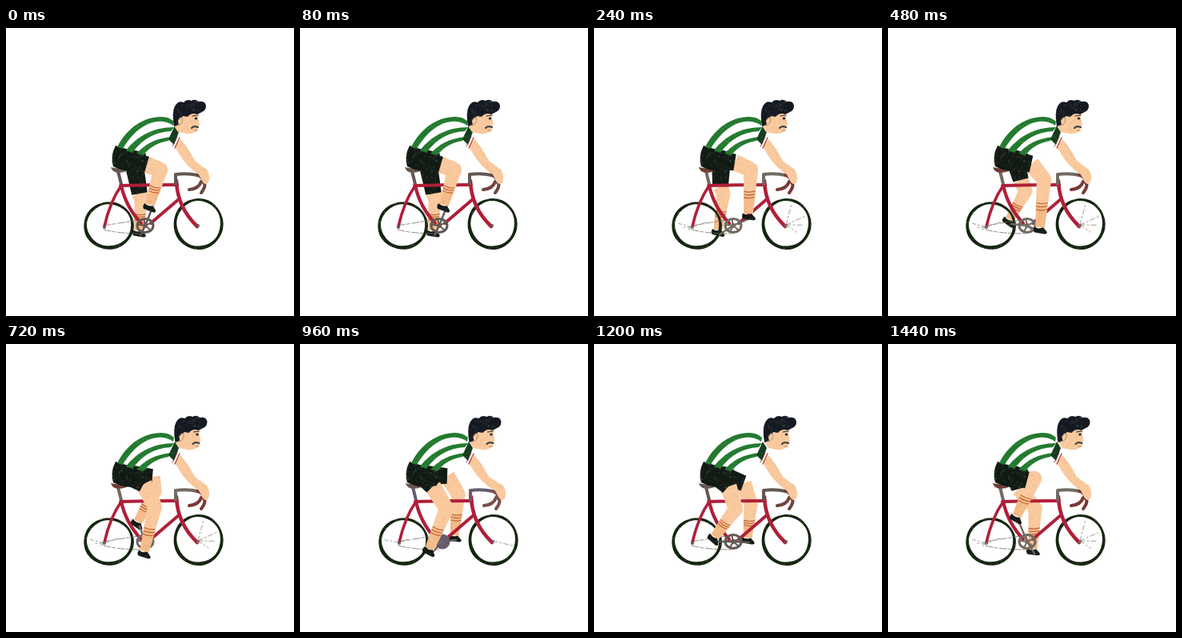
Recreate the animation shown at these times as an HTML page with a canvas. Size 360 by 360 pixels, loop 1.68 s.

```html
<!DOCTYPE html>
<html lang="en">
<head>
<meta charset="utf-8">
<title>Cyclist</title>
<style>
html, body { margin: 0; width: 100%; height: 100%; overflow: hidden; background: #fff; }
canvas { display: block; width: 360px; height: 360px; }
</style>
</head>
<body>
<canvas id="stage" width="360" height="360"></canvas>
<script>
const ctx = document.getElementById('stage').getContext('2d');
const STEP = 240;
const SKIN = '#fac99d', SOCK = '#f5bb88', BLACK = '#121a14', GREEN = '#227a2e', RED = '#b01f38', TYRE = '#14240f';

// Each leg: hem x, y, knee x, y, ankle x, y.
const poses = [
  { near: [176, 171, 193, 177, 180, 221], far: [167, 207, 169, 213, 166, 253], head: 0, look: 'bare' },
  { near: [176, 168, 196, 177, 193, 232], far: [158, 198, 162, 207, 155, 252], head: 0, look: 'spoked' },
  { near: [179, 170, 195, 189, 190, 249], far: [166, 190, 172, 204, 152, 239], head: 1, look: 'spoked' },
  { near: [172, 175, 186, 203, 173, 259], far: [183, 166, 186, 184, 165, 222], head: 1.5, look: 'spoked' },
  { near: [166, 178, 183, 206, 162, 256], far: [184, 165, 198, 188, 193, 239], head: 1.5, look: 'solid' },
  { near: [168, 178, 177, 206, 151, 241], far: [187, 174, 196, 200, 192, 242], head: 3, look: 'bare' },
  { near: [174, 170, 183, 168, 161, 215], far: [164, 181, 184, 205, 181, 256], head: 2.5, look: 'spoked' }
];
const looks = {
  bare: { metal: '#625752', saddle: '#685850', grip: '#704541' },
  spoked: { metal: '#716b62', saddle: '#713c33', grip: '#7b3935' },
  solid: { metal: '#665b6c', saddle: '#6b5350', grip: '#7c504d' }
};

function makeGrain() {
  const tile = document.createElement('canvas');
  tile.width = tile.height = 64;
  const g = tile.getContext('2d');
  let seed = 17;
  const random = () => (seed = seed * 16807 % 2147483647) / 2147483647;
  for (let i = 0; i < 420; i++) {
    g.fillStyle = random() < 0.6 ? 'rgba(255,255,255,.1)' : 'rgba(40,30,0,.05)';
    g.fillRect(random() * 64, random() * 64, 1 + random(), 1 + random());
  }
  return ctx.createPattern(tile, 'repeat');
}
const grain = makeGrain();

function fill(shape, color) {
  const path = typeof shape === 'string' ? new Path2D(shape) : shape;
  for (const style of [color, grain]) {
    ctx.fillStyle = style;
    ctx.fill(path, 'evenodd');
  }
}

function line(d, color, width) {
  ctx.strokeStyle = color;
  ctx.lineWidth = width;
  ctx.stroke(new Path2D(d));
}

function disc(x, y, r, color) {
  const path = new Path2D();
  path.arc(x, y, r, 0, Math.PI * 2);
  fill(path, color);
}

function taper(x1, y1, r1, x2, y2, r2, color) {
  const a = Math.atan2(y2 - y1, x2 - x1), nx = -Math.sin(a), ny = Math.cos(a);
  const path = new Path2D();
  path.moveTo(x1 + nx * r1, y1 + ny * r1);
  path.lineTo(x2 + nx * r2, y2 + ny * r2);
  path.lineTo(x2 - nx * r2, y2 - ny * r2);
  path.lineTo(x1 - nx * r1, y1 - ny * r1);
  path.closePath();
  fill(path, color);
}

function leg([hx, hy, kx, ky, ax, ay], hipX, size) {
  taper(hx, hy, 10.5 * size, kx, ky, 9.2 * size, SKIN);
  disc(kx, ky, 9.2 * size, SKIN);
  taper(kx, ky, 9.2 * size, ax, ay, 5.6 * size, SKIN);
  taper((kx + ax) / 2, (ky + ay) / 2, 7.4 * size, ax, ay, 5.6 * size, SOCK);

  const lean = Math.atan2(kx - ax, ay - ky);
  ctx.save();
  ctx.translate(ax, ay);
  ctx.rotate(lean);
  const length = Math.hypot(kx - ax, ky - ay);
  for (const t of [0.36, 0.43, 0.5]) {
    const y = -length * t, half = 5.2 + 3 * t;
    line(`M${-half} ${y}Q0 ${y + 1.5} ${half} ${y - 1}`, '#bd5f35', 1.1);
  }
  fill('M-7 0Q-2 3 4 0L9 5Q10 8 6 8L-6 7Q-9 5-7 0Z', BLACK);
  ctx.restore();

  taper(hipX, 164, 12, hx, hy, 10.5 * size, BLACK);
}

function wheel(x, y, rx, ry) {
  const path = new Path2D();
  const trace = (cx, cy, inset, wobble) => {
    for (let deg = 0; deg <= 360; deg += 6) {
      const a = deg * Math.PI / 180, r = 1 + wobble * Math.sin(5 * a + 1);
      path[deg ? 'lineTo' : 'moveTo'](cx + Math.cos(a) * (rx - inset) * r, cy + Math.sin(a) * (ry - inset) * r);
    }
    path.closePath();
  };
  trace(x, y, 0, 0.006);
  trace(x + 0.3, y - 0.6, 3.7, -0.008);
  fill(path, TYRE);
}

function spokes(x, y, angles, reach) {
  ctx.setLineDash([6, 3, 2, 3]);
  angles.forEach((deg, i) => {
    const a = deg * Math.PI / 180, r = reach - i % 3 * 5;
    line(`M${x} ${y}L${x + Math.cos(a) * r} ${y + Math.sin(a) * r}`, '#77736e', 0.7);
  });
  ctx.setLineDash([]);
}

function bike(look) {
  const { metal, saddle, grip } = looks[look];
  const shift = look === 'solid' ? 1 : 0;
  ctx.save();
  ctx.translate(shift, 0);
  wheel(128.5, 247, 31.3, 29.7);
  wheel(240.5, 245, 31, 32);
  if (look === 'spoked') {
    spokes(123, 249, [-165, 178, 150, -20], 18);
    spokes(240, 246, [-24, 1, 35, -75], 26);
  } else if (look === 'solid') {
    spokes(123, 248, [-170, -20], 18);
    spokes(240, 246, [14], 27);
  }
  ctx.setLineDash([9, 2, 4, 3]);
  line('M122 247L166 240M122 252Q140 257 172 257', '#77706b', 0.8);
  ctx.setLineDash([]);

  line('M140 179L144 195', metal, 4);
  fill('M131 174Q142 177 155 175Q153 180 141 181Q133 181 131 174Z', saddle);
  line('M144 197Q130 217 123 248', RED, 3.6);
  line('M144 197Q150 224 169 244', RED, 4.2);
  line('M143 197Q180 196 214 196', RED, 3.8);
  line('M216 214L181 244', RED, 4);
  line('M213 191Q214 224 239 248', RED, 4.6);
  disc(123, 249, 2, metal);
  disc(240, 247, 2, metal);
  line('M212 195L212 183Q226 181 240 184', metal, 4);
  line('M239 184Q246 185 247 193Q251 197 244 206M244 192Q241 201 229 202', grip, 4);
  ctx.restore();
}

function crank(pose) {
  const { metal } = looks[pose.look];
  const x = pose.look === 'solid' ? 178 : 174, y = 247;
  for (const foot of [pose.far, pose.near])
    line(`M${x} ${y}L${foot[4] + 2} ${foot[5] + 6}`, metal, 2.4);
  if (pose.look === 'solid') {
    disc(x, y, 9.5, metal);
    return;
  }
  ctx.strokeStyle = metal;
  ctx.lineWidth = 3;
  ctx.beginPath();
  ctx.ellipse(x, y, 10, 8.5, 0, 0, Math.PI * 2);
  ctx.stroke();
  for (let i = 0; i < 5; i++) {
    const a = i * Math.PI * 0.4 - 0.5;
    line(`M${x} ${y}L${x + Math.cos(a) * 9} ${y + Math.sin(a) * 8}`, metal, 2);
  }
  disc(x, y, 3, metal);
}

function torso(handShift) {
  fill('M139 149C151 125 172 111 194 111Q204 111 210 117L209 122C196 112 168 114 146 151Z', GREEN);
  fill('M150 153C164 135 184 124 210 124L206 129C186 130 170 139 158 156Z', GREEN);
  fill('M163 157C174 145 187 138 207 136L203 141C190 143 179 149 172 159Z', GREEN);
  fill('M211 122L216 130L210 146L203 139Z', '#173d20');
  const h = handShift;
  fill(`M211 148L218 139Q228 150 236 166L${251 + h} 177Q${256 + h} 185 ${253 + h} 193Q${249 + h} 198 ${245 + h} 191L${241 + h} 183Q224 173 211 148Z`, SKIN);
  line('M211 150L217 137', '#b94643', 1.4);
  line('M208 148L214 136', '#702c2e', 0.8);
}

function head(dx) {
  ctx.save();
  ctx.translate(dx, 0);
  fill('M214 106L237 103Q241 107 240 112L242 121L239 124L240 128Q234 133 225 132L215 130L211 124Z', SKIN);
  fill('M210 123Q207 105 211 98Q215 90 222 93Q226 88 232 91Q236 88 241 92Q249 91 250 97Q250 103 245 105L239 108Q232 105 227 111L221 110L216 121Z', '#151a22');
  fill('M215 116Q218 109 222 113Q222 120 216 122Z', SKIN);
  line('M216 115Q220 109 221 115Q220 120 216 122', '#8f755d', 0.7);
  line('M233 110L240 109', '#30302e', 1.2);
  ctx.fillStyle = '#282b2d';
  ctx.beginPath();
  ctx.ellipse(237.5, 113, 1.8, 1.5, 0, 0, Math.PI * 2);
  ctx.fill();
  line('M232 125Q235 122 240 124', '#454442', 2.2);
  line('M235 128L239 128', '#bd7661', 0.8);
  ctx.restore();
}

function draw(pose) {
  ctx.fillStyle = '#fff';
  ctx.fillRect(0, 0, 360, 360);
  leg(pose.far, 159, 0.94);
  bike(pose.look);
  crank(pose);
  leg(pose.near, 152, 1);
  fill('M137 147Q150 152 162 153L175 157L171 177Q150 182 134 173Q130 160 137 147Z', BLACK);
  torso(pose.look === 'solid' ? 3 : 0);
  head(pose.head);
}

function tick() {
  draw(poses[Math.floor(performance.now() / STEP) % poses.length]);
  requestAnimationFrame(tick);
}
ctx.lineCap = 'round';
ctx.lineJoin = 'round';
tick();
</script>
</body>
</html>
```
